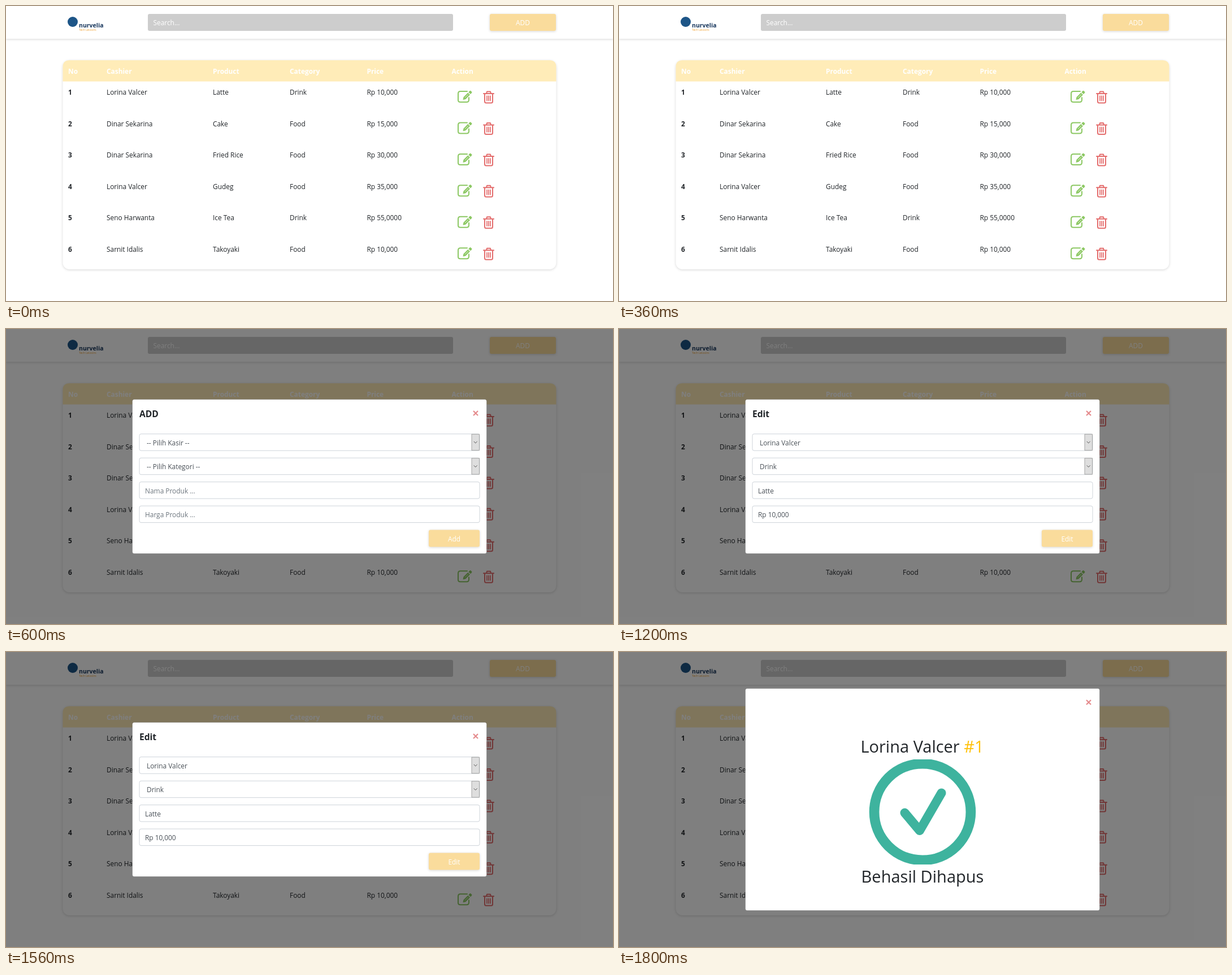
These frames come from a looping animation (1074x522 px, 2.4 s). An HTML page:

```html
<!DOCTYPE html>
<html lang="id">
<head>
<meta charset="utf-8">
<style>
  html, body { margin: 0; width: 100%; height: 100%; overflow: hidden; background: #fff; }
  svg { display: block; font: 11.9px "Open Sans", "Noto Sans", sans-serif; fill: #212529; }
  .bold { font-weight: 700; }
  .mid { text-anchor: middle; }
  .big { font-size: 29px; }
  .soft { filter: drop-shadow(0 1px 2px rgba(0, 0, 0, .16)); }
  .line { fill: none; stroke-linecap: round; stroke-linejoin: round; }
</style>
</head>
<body>
<svg id="stage" width="1074" height="522" viewBox="0 0 1074 522">
  <defs>
    <g id="edit">
      <path class="line" stroke="#8cc863" stroke-width="2" d="M17 2H5Q1 2 1 6V17.500Q1 21 5 21H16Q20 21 20 17V13"/>
      <path fill="#8cc863" d="M9.500 17L10.500 12.200L18.300 4.400L22 8.100L14.200 15.900ZM19.300 3.400L21.500 1.200Q22.500 .3 23.500 1.200L25 2.700Q26 3.700 25 4.700L23 7.100Z"/>
      <path stroke="#fff" stroke-width=".8" d="M13 13.300L19 7.300"/>
    </g>
    <g id="trash" class="line" stroke="#e46d6d" stroke-width="2">
      <path d="M1 5H19M6 5L7 1.500H13L14 5M3 5V19Q3 21.500 5.500 21.500H14.500Q17 21.500 17 19V5"/>
      <path stroke-width="1.700" d="M7 9V17.500M10 9V17.500M13 9V17.500"/>
    </g>
    <path id="close" stroke="#e58b8d" stroke-width="2.200" d="M-4 -4L4 4M4 -4L-4 4"/>
    <clipPath id="crop"><rect x="440" y="190" width="194" height="186"/></clipPath>
  </defs>

  <rect class="soft" width="1074" height="58" fill="#fff"/>
  <circle cx="118" cy="28" r="9" fill="#1d5587"/>
  <text class="bold" x="129" y="38" font-size="10.500" fill="#17365c">nurvelia</text>
  <text x="129" y="44" font-size="5" fill="#f0a030">Tech Lessons</text>
  <rect x="251" y="14" width="540" height="30" rx="3" fill="#cdcdcd"/>
  <text x="260.500" y="33.500" fill="#fff">Search...</text>
  <rect class="soft" x="856" y="14" width="117" height="30" rx="3" fill="#fadc9c"/>
  <text class="mid" x="914.500" y="33.500" fill="#fff">ADD</text>

  <rect class="soft" x="100.500" y="96" width="873" height="370" rx="12" fill="#fff"/>
  <path fill="#ffecb8" d="M100.500 133.500V108Q100.500 96 112.500 96H961.500Q973.500 96 973.500 108V133.500Z"/>
  <g id="table"></g>
  <rect id="shade" width="1074" height="522" fill-opacity=".5" style="fill:#000"/>
  <g id="modal"></g>
</svg>
<script>
  const $ = id => document.getElementById(id);
  const text = (x, y, s, attrs = '') => `<text x="${x}" y="${y}" ${attrs}>${s}</text>`;

  const columns = [110, 178, 366, 502, 638.5, 788.5];
  const titles = ['No', 'Cashier', 'Product', 'Category', 'Price', 'Action'];
  const rows = [
    ['Lorina Valcer', 'Latte', 'Drink', 'Rp 10,000'],
    ['Dinar Sekarina', 'Cake', 'Food', 'Rp 15,000'],
    ['Dinar Sekarina', 'Fried Rice', 'Food', 'Rp 30,000'],
    ['Lorina Valcer', 'Gudeg', 'Food', 'Rp 35,000'],
    ['Seno Harwanta', 'Ice Tea', 'Drink', 'Rp 55,0000'],
    ['Sarnit Idalis', 'Takoyaki', 'Food', 'Rp 10,000'],
  ];

  const tableRow = (row, i) => {
    const y = 157.3 + 55.45 * i;
    return [i + 1, ...row].map((s, c) => text(columns[c], y, s, c ? '' : 'class="bold"')).join('') +
      `<use href="#edit" x="799" y="${y - 8.3}"/><use href="#trash" x="844" y="${y - 7.3}"/>`;
  };

  const panel = (y, height) =>
    `<rect x="223.500" y="${y}" width="627" height="${height}" rx="3.500" fill="#fff" stroke="#000" stroke-opacity=".2"/>
     <use href="#close" x="831" y="${y + 24.5}"/>`;

  const field = (value, i, color) => {
    const y = 185.7 + 42.45 * i, isSelect = i < 2;
    const arrow = `<rect x="824" y="${y + .5}" width="13.500" height="28.500" fill="#dedede" stroke="#a5a5a5"/>
      <path class="line" stroke="#555" d="M828 ${y + 13.5}l2.700 2.700l2.700 -2.700"/>`;
    return `<rect x="236" y="${y}" width="602" height="29.500" rx="3" fill="#fff" stroke="#ced4da"/>` +
      (isSelect ? arrow : '') + text(isSelect ? 249 : 246, y + 20, value, `fill="${color}"`);
  };

  const form = (title, button, values, inputColor) =>
    panel(124.5, 273) + text(236, 156, title, 'class="bold" font-size="15.600"') +
    values.map((v, i) => field(v, i, i < 2 ? '#495057' : inputColor)).join('') +
    '<rect class="soft" x="748" y="355.500" width="90" height="30" rx="3" fill="#fadc9c"/>' +
    text(793, 375.5, button, 'class="mid" fill="#fff"');

  const [name, product, category, price] = rows[0];
  const deleted = panel(64.5, 393) +
    text(536.5, 178, `${name} <tspan fill="#ffc107">#1</tspan>`, 'class="mid big"') +
    `<g class="line" stroke="#3eb39e">
       <circle cx="537" cy="283" r="85.400" stroke-width="17.700" clip-path="url(#crop)"/>
       <path stroke-width="16" d="M505.500 284.500L532 316L570.500 249.500"/>
     </g>` +
    text(537, 408, 'Behasil Dihapus', 'class="mid big"');

  const scenes = [
    '',
    form('ADD', 'Add', ['-- Pilih Kasir --', '-- Pilih Kategori --', 'Nama Produk ...', 'Harga Produk ...'], '#6c757d'),
    form('Edit', 'Edit', [name, category, product, price], '#495057'),
    deleted,
  ];

  $('table').innerHTML =
    titles.map((s, i) => text(columns[i], 119.5, s, 'class="bold" fill="#fff"')).join('') +
    rows.map(tableRow).join('');

  let shown = -1;
  function draw(now) {
    const scene = Math.floor(now % 2400 / 600);
    if (scene !== shown) {
      shown = scene;
      $('shade').style.display = scene ? '' : 'none';
      $('modal').innerHTML = scenes[scene];
    }
    requestAnimationFrame(() => draw(performance.now()));
  }
  draw(0);
</script>
</body>
</html>
```
